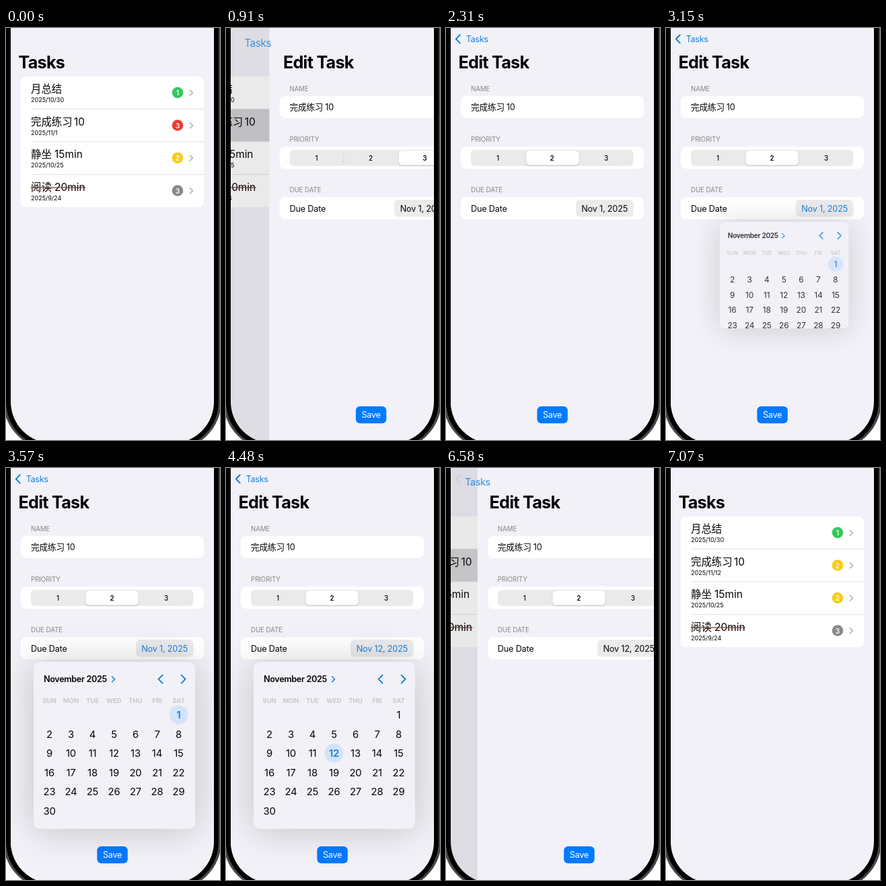
Recreate the animation shown at these times as an HTML page. Size 318 by 612 pixels, loop 7350 ms.

```html
<!DOCTYPE html>
<html lang="zh-CN">
<head>
<meta charset="utf-8">
<title>Task editor</title>
<style>
  html, body { margin: 0; width: 100%; height: 100%; overflow: hidden; background: #fff; }
  svg { display: block; width: 318px; height: 612px; }
  text {
    font-family: Inter, "Noto Sans CJK SC", "Noto Sans CJK", "Liberation Sans", sans-serif;
    font-size: 12.65px; font-optical-sizing: none; fill: #060606;
  }
  .title { font-size: 25.2px; font-weight: 700; letter-spacing: -.75px; fill: #000; }
  .row { font-size: 15.4px; }
  .date { font-size: 9.1px; letter-spacing: -.05px; }
  .badge { font-size: 11px; font-weight: 500; fill: #fff; text-anchor: middle; }
  .body { letter-spacing: -.18px; }
  .link { letter-spacing: -.35px; fill: #1580dd; }
  .head { font-size: 9.7px; letter-spacing: -.05px; fill: #85858a; }
  .seg { font-size: 9.8px; font-weight: 500; text-anchor: middle; }
  .save { letter-spacing: -.3px; fill: #fff; text-anchor: middle; }
  .month { font-weight: 600; letter-spacing: -.36px; }
  .week { font-size: 9.6px; font-weight: 600; fill: #c3c3c8; text-anchor: middle; }
  .day { font-size: 14.9px; letter-spacing: -.2px; text-anchor: middle; }
  .day.on { font-weight: 600; fill: #1580dd; }
  .end { text-anchor: end; }
  .line { fill: none; stroke: #1580dd; stroke-linecap: round; stroke-linejoin: round; }
</style>
</head>
<body>
<svg viewBox="0 0 318 612">
  <defs>
    <clipPath id="screen"><rect x="7" y="-80" width="302" height="697" rx="62"/></clipPath>
    <clipPath id="cardClip"><rect class="cardSize" x="41" y="288" width="240" height="248" rx="9"/></clipPath>
    <filter id="soft" filterUnits="userSpaceOnUse" x="-80" y="160" width="490" height="510">
      <feGaussianBlur stdDeviation="28"/>
    </filter>
    <filter id="lift" x="-10%" y="-30%" width="120%" height="170%">
      <feDropShadow dx="0" dy="1.2" stdDeviation="1.3" flood-opacity=".2"/>
    </filter>
  </defs>
  <rect x="-4" y="-91" width="324" height="718" rx="73" fill="#48484b"/>
  <rect x="0" y="-87" width="316" height="711" rx="69"/>
  <g clip-path="url(#screen)">
    <g id="list"></g>
    <rect id="dim" x="7" width="302" height="612"/>
    <g id="edit"></g>
    <g id="nav">
      <g id="back">
        <text id="backBig" class="title" transform="scale(.485)">Tasks</text>
        <text id="backSmall" class="link">Tasks</text>
      </g>
      <path id="backArrow" class="line" stroke-width="2" d="M20.8 10.2L14.8 16.3L20.8 22.4"/>
      <text id="editTitle" class="title" x="18.5" y="59.8">Edit Task</text>
    </g>
    <g id="calendar"></g>
  </g>
</svg>
<script>
const LOOP = 7350, STEP = 70;
const PUSH = 740, SEGMENT = 2000, OPEN = 2984, PICK = 4480, CLOSE = 5650, CLOSED = 5880, POP = 6545;
const BG = '#f1f1f7';
const $ = id => document.getElementById(id);

const text = (x, y, s, cls, attrs = '') => `<text x="${x}" y="${y}" class="${cls}" ${attrs}>${s}</text>`;
const box = (x, y, w, h, r, fill, attrs = '') =>
  `<rect x="${x}" y="${y}" width="${w}" height="${h}" rx="${r}" fill="${fill}" ${attrs}/>`;
const line = (d, w, attrs = '') => `<path class="line" d="${d}" stroke-width="${w}" ${attrs}/>`;

const GREEN = '#34c759', RED = '#ea3a31', YELLOW = '#f8cc14', GREY = '#888889';
const exercise = dx => `完成练习<tspan dx="${dx}">10</tspan>`;
const tasks = [
  ['月总结', '2025/10/30', 1, GREEN],
  [exercise(2.5), '2025/11/1', 3, RED],
  ['静坐 15min', '2025/10/25', 2, YELLOW],
  ['阅读 20min', '2025/9/24', 3, GREY]
];

function buildList() {
  let out = box(7, 0, 302, 612, 0, BG) + box(22, 72, 272, 194, 8, '#fff') +
    box(22, 120.5, 272, 48, 0, '#d1d1d6', 'id="pressed"');
  tasks.forEach(([name, date, level, color], i) => {
    const y = 48.5 * i;
    if (i) out += box(37, 72 + y - .4, 257, .8, 0, '#dedee2');
    out += text(37, 96 + y, name, 'row') +
      text(37, 110 + y, date, 'date', `id="date${i}"`) +
      `<circle id="dot${i}" cx="255" cy="${96 + y}" r="8.3" fill="${color}"/>` +
      text(255, 100 + y, level, 'badge', `id="level${i}"`) +
      line(`M273.4 ${92.2 + y}l4 4l-4 4`, 1.4, 'style="stroke:#a9a9ae"');
  });
  return out + box(37, 236.4, 81, 1.2, 0, '#74302b');
}

function buildEdit() {
  const section = (name, y) => text(37, y - 7.1, name, 'head') + box(22, y, 272, 33, 8, '#fff');
  return box(7, 0, 302, 612, 0, BG) +
    section('NAME', 101) + text(37, 122.2, exercise(3), 'body') +
    section('PRIORITY', 176.2) +
    box(37, 181, 241.5, 24, 6, '#eaeaeb') +
    box(116.9, 186.5, .9, 13, 0, '#cfcfd2', 'id="divider"') +
    box(199.5, 182.5, 78, 21, 5.5, '#fff', 'id="thumb" filter="url(#lift)"') +
    [1, 2, 3].map(n => text(77 + 80.5 * (n - 1), 196.6, n, 'seg', `id="seg${n}"`)).join('') +
    section('DUE DATE', 251.3) + text(37, 272.7, 'Due Date', 'body') +
    box(193, 255, 85.5, 25.6, 6, '#ebebed', 'id="pill"') +
    text(270, 272.7, '', 'body end', 'id="due"') +
    box(135.4, 562, 45.4, 25.3, 6, '#007aff') + text(158, 579.3, 'Save', 'save');
}

function buildCalendar() {
  const col = i => 64.5 + 32 * i, row = j => 366.5 + 28.5 * j;
  let days = '';
  for (let d = 1; d <= 30; d++) {
    const x = col((d + 5) % 7), y = row(Math.floor((d + 5) / 7));
    if (d === 1 || d === 12)
      days += `<circle id="ring${d}" cx="${x}" cy="${y}" r="14" fill="#007aff" fill-opacity=".12"/>`;
    days += text(x, y + 5.5, d, 'day', `id="day${d}"`);
  }
  const week = ['SUN', 'MON', 'TUE', 'WED', 'THU', 'FRI', 'SAT'];
  return box(41, 290, 240, 248, 9, '#000', 'class="cardSize" opacity=".2" filter="url(#soft)"') +
    '<g clip-path="url(#cardClip)">' + box(41, 288, 240, 248, 0, BG) +
    text(56, 318.1, 'November 2025', 'month') +
    line('M157.6 309.8l4 4l-4 4', 1.6) +
    line('M232.6 307.6l-6 6l6 6', 2) + line('M260.6 307.6l6 6l-6 6', 2) +
    week.map((w, i) => text(col(i), 349, w, 'week')).join('') + days + '</g>';
}

$('list').innerHTML = buildList();
$('edit').innerHTML = buildEdit();
$('calendar').innerHTML = buildCalendar();

// Critically damped spring, 0 to 1
function spring(ms) {
  if (ms <= 0) return 0;
  const x = ms * .018, p = 1 - (1 + x) * Math.exp(-x);
  return p > .997 ? 1 : p;
}
const mix = (a, b, p) => a + (b - a) * p;
const clamp = v => Math.max(0, Math.min(1, v));
const set = (id, attrs) => {
  for (const key in attrs) $(id).setAttribute(key, attrs[key]);
};

function drawPages(t) {
  const p = t < POP ? spring(t - PUSH) : 1 - spring(t - POP);
  const saved = t >= POP;
  set('list', { transform: `translate(${-90.6 * p} 0)` });
  set('dim', { opacity: .1 * p });
  set('edit', { transform: `translate(${302 * (1 - p)} 0)`, visibility: p > 0 ? 'visible' : 'hidden' });
  set('pressed', { opacity: t < PUSH ? 0 : saved ? p : 1 });
  set('back', { transform: `translate(${mix(18.5, 29.7, p)} ${mix(59.8, 20.7, p)}) scale(${mix(2.06, 1, p)})` });
  set('backBig', { opacity: clamp(1 - 1.6 * p) });
  set('backSmall', { opacity: p });
  set('backArrow', { opacity: clamp((p - .85) / .15) });
  set('editTitle', { transform: `translate(${349 * (1 - p)} 0)`, opacity: clamp(p * 3) });
  $('date1').textContent = saved ? '2025/11/12' : '2025/11/1';
  $('level1').textContent = saved ? 2 : 3;
  set('dot1', { fill: saved ? YELLOW : RED });
}

function drawForm(t) {
  const m = spring((t - SEGMENT) * 1.2);
  set('thumb', { x: mix(199.5, 118.6, m) });
  set('divider', { opacity: 1 - m });
  set('seg2', { style: `font-weight:${m > .5 ? 600 : 500}` });
  set('seg3', { style: `font-weight:${m > .5 ? 500 : 600}` });

  const picked = t >= PICK, active = t >= OPEN && t < CLOSE;
  $('due').textContent = picked ? 'Nov 12, 2025' : 'Nov 1, 2025';
  set('due', { style: `fill:${active ? '#1580dd' : '#060606'}` });
  set('pill', { x: picked ? 185 : 193, width: picked ? 93.5 : 85.5 });
}

function drawCalendar(t) {
  const shown = t >= OPEN && t < CLOSED;
  set('calendar', { visibility: shown ? 'visible' : 'hidden' });
  if (!shown) return;
  const s = Math.max(.01, t < CLOSE ? spring(t - OPEN) : 1 - spring(t - CLOSE));
  set('calendar', {
    transform: `translate(234 288) scale(${s}) translate(-234 -288)`,
    opacity: s
  });
  document.querySelectorAll('.cardSize').forEach(r => r.setAttribute('height', 248 * s));
  const chosen = t < PICK ? 1 : 12;
  for (const d of [1, 12]) {
    set('ring' + d, { opacity: d === chosen ? 1 : 0 });
    set('day' + d, { class: d === chosen ? 'day on' : 'day' });
  }
}

const start = performance.now();
function frame() {
  const now = Math.max(0, performance.now() - start) % LOOP;
  const t = Math.floor(now / STEP) * STEP;
  drawPages(t);
  drawForm(t);
  drawCalendar(t);
  requestAnimationFrame(frame);
}
frame();
</script>
</body>
</html>
```
